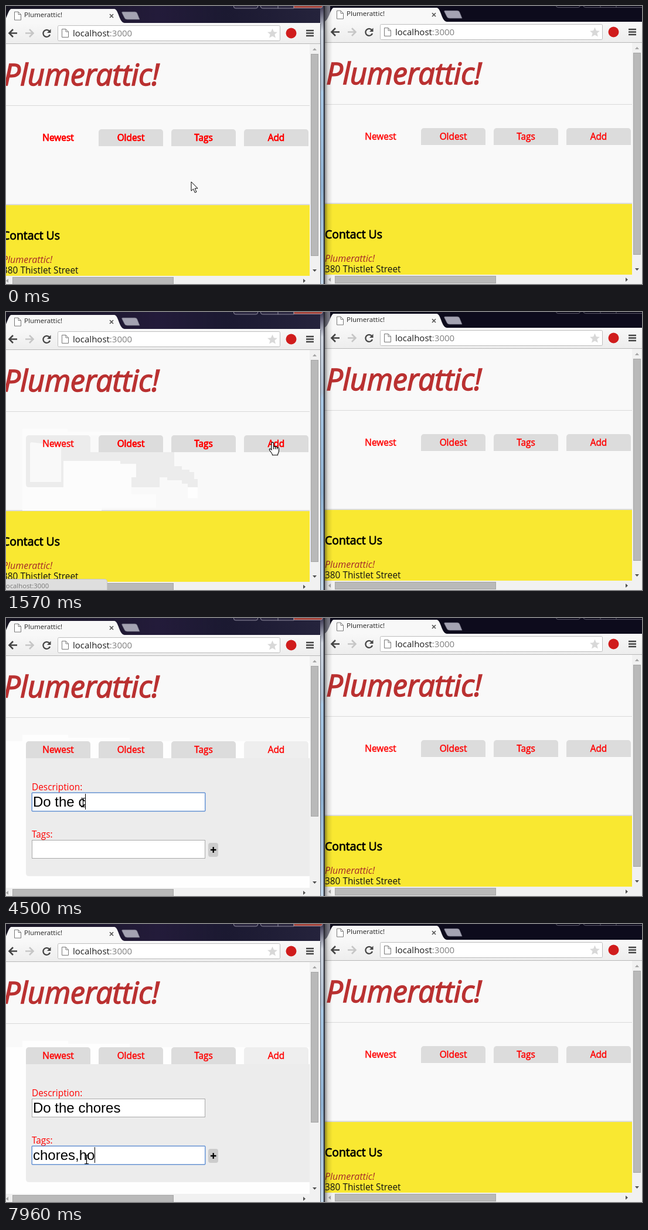
Write an HTML page that moves like this. It is 1085x476 px and loops after 8 s.

```html
<!DOCTYPE html>
<html lang="en">
<head>
<meta charset="utf-8">
<title>Plumerattic!</title>
<style>
  html, body { margin: 0; width: 100%; height: 100%; overflow: hidden; background: #1a1530; }
  svg { display: block; }
  text { font: 15.4px "Open Sans", "Noto Sans", sans-serif; }
  .mid { text-anchor: middle; }
  .tab { fill: #f00; stroke: #f00; stroke-width: .5; }
  .label { fill: #f00; }
  .url { font-size: 15px; }
  .field { fill: #fff; stroke: #a9a9a9; }
  .focus { fill: none; stroke: #5a8fdb; stroke-width: 1.3; }
  .typed { font: 24px "Liberation Sans", Arial, sans-serif; }
  .grey { fill: #dcdcdc; }
  .panel { fill: #ececec; }
  .white { fill: #fefefe; }
  .pale { fill: #fcfcfc; }
  .thumb { fill: #b9b9b9; stroke: #a6a6a6; }

  .step { animation: 8s step-end infinite; }
  .form { animation-name: form; }
  .trail1 { animation-name: trail1; }
  .trail2 { animation-name: trail2; }
  .trail3 { animation-name: trail3; }
  .focus1 { animation-name: focus1; }
  .focus2 { animation-name: focus2; }
  .type1 { animation-name: type1; }
  .type2 { animation-name: type2; }
  .caret1 { animation-name: caret1; }
  .caret2 { animation-name: caret2; }
  .arrow { animation-name: arrow; }
  .hand { animation-name: hand; }
  .beam { animation-name: beam; }
  .status { animation: status 8s linear infinite; }
  .pointer { animation: move 8s linear infinite; }

  @keyframes form { 0% { visibility: hidden } 23.125%, 100% { visibility: visible } }
  @keyframes trail1 { 0%, 23.125%, 100% { visibility: hidden } 5.7% { visibility: visible } }
  @keyframes trail2 { 0%, 23.125%, 100% { visibility: hidden } 8% { visibility: visible } }
  @keyframes trail3 { 0%, 23.125%, 100% { visibility: hidden } 10.5% { visibility: visible } }
  @keyframes focus1 { 0%, 74%, 100% { visibility: hidden } 32.75% { visibility: visible } }
  @keyframes focus2 { 0% { visibility: hidden } 74%, 100% { visibility: visible } }
  @keyframes caret1 { 0%, 39.125%, 68.5%, 100% { visibility: hidden } 32.75%, 46% { visibility: visible } }
  @keyframes caret2 { 0%, 96.5% { visibility: hidden } 74%, 96.875%, 100% { visibility: visible } }
  @keyframes arrow {
    0%, 13.1%, 28.1%, 69.25% { visibility: visible }
    10.6%, 16.5%, 30.4%, 70.7%, 100% { visibility: hidden }
  }
  @keyframes hand { 0%, 13.1%, 28.1%, 100% { visibility: hidden } 10.6%, 16.5% { visibility: visible } }
  @keyframes beam { 0%, 69.25% { visibility: hidden } 30.4%, 70.7%, 100% { visibility: visible } }
  @keyframes status { 0%, 18.5% { opacity: 0 } 19.6%, 27.9% { opacity: 1 } 29.4%, 100% { opacity: 0 } }

  /* the white sheet slides off the text, one letter at a time */
  @keyframes type1 {
    0% { transform: none }
    46% { transform: translateX(17px) }
    47.375% { transform: translateX(31px) }
    48.625% { transform: translateX(37px) }
    50% { transform: translateX(44px) }
    52% { transform: translateX(57px) }
    53.125% { transform: translateX(71px) }
    54.25% { transform: translateX(77px) }
    56.25% { transform: translateX(89px) }
    57.45% { transform: translateX(103px) }
    58.625% { transform: translateX(116px) }
    59.875% { transform: translateX(124px) }
    61% { transform: translateX(137px) }
    62.25%, 100% { transform: translateX(149px) }
  }
  @keyframes type2 {
    0% { transform: none }
    79.625% { transform: translateX(12px) }
    80.75% { transform: translateX(25px) }
    81.875% { transform: translateX(39px) }
    83% { transform: translateX(47px) }
    84.125% { transform: translateX(60px) }
    85.25% { transform: translateX(72px) }
    90.25% { transform: translateX(79px) }
    96.875% { transform: translateX(92px) }
    99.5%, 100% { transform: translateX(105px) }
  }
  @keyframes move {
    0%, 4.3% { transform: translate(316px, 301px) }
    5.75% { transform: translate(280px, 268px) }
    7% { transform: translate(225px, 266px) }
    8.1% { transform: translate(160px, 312px) }
    9% { transform: translate(90px, 350px) }
    9.9% { transform: translate(34px, 290px) }
    10.7% { transform: translate(48px, 228px) }
    11.6% { transform: translate(105px, 233px) }
    12.875% { transform: translate(209px, 235px) }
    13.6% { transform: translate(265px, 284px) }
    14.375% { transform: translate(326px, 303px) }
    15.5% { transform: translate(394px, 272px); animation-timing-function: ease-out }
    17%, 26.1% { transform: translate(455px, 223px); animation-timing-function: ease-in-out }
    32.5%, 68% { transform: translate(131px, 316px); animation-timing-function: ease-in-out }
    72.125%, 100% { transform: translate(137px, 403px) }
  }
</style>
</head>
<body>
<svg width="1085" height="476">
  <defs>
    <linearGradient id="sky">
      <stop offset="0" stop-color="#15131f"/><stop offset=".48" stop-color="#231b3a"/>
      <stop offset=".7" stop-color="#1b1931"/><stop offset="1" stop-color="#25233c"/>
    </linearGradient>
    <linearGradient id="bar" x2="0" y2="1">
      <stop offset="0" stop-color="#f8f8f8"/><stop offset="1" stop-color="#ededed"/>
    </linearGradient>
    <linearGradient id="edge" x2="0" y2="1">
      <stop offset="0" stop-color="#3a3650"/><stop offset=".09" stop-color="#d0d6e0"/>
      <stop offset=".29" stop-color="#aebfd2"/><stop offset=".31" stop-color="#a9c9e6"/>
      <stop offset=".65" stop-color="#8fb2d3"/><stop offset="1" stop-color="#c2d7ea"/>
    </linearGradient>
    <linearGradient id="shade">
      <stop offset="0" stop-opacity=".42"/><stop offset=".4" stop-opacity=".12"/><stop offset="1" stop-opacity="0"/>
    </linearGradient>

    <path id="tabshape" d="M0 29V5a5 5 0 0 1 5-5H105a5 5 0 0 1 5 5V29Z"/>
    <g id="sheet" fill="#fff" stroke="#777">
      <path d="M.5 .5H7L11.500 5V14.500H.5Z"/><path d="M7 .5V5H11.500" fill="none"/>
    </g>
    <g id="names" class="tab mid">
      <text x="89" y="231">Newest</text>
      <text x="213" y="231">Oldest</text>
      <text x="337" y="231">Tags</text>
      <text x="461" y="231">Add</text>
    </g>

    <g id="window">
      <!-- browser tab and toolbar -->
      <path d="M-8 29C1 28 3 6 9 5H185C192 6 193 28 202 29Z" fill="#f8f8f8"/>
      <path d="M199 10H220Q223 10 224 13L228 23H207Q203 23 202 20L198 12Q197 10 199 10Z" fill="#a4a3b2" stroke="#6c6a7c" stroke-width=".7"/>
      <use href="#sheet" x="14" y="9.500"/>
      <text x="31" y="19" style="font-size:11.600px" fill="#222">Plumerattic!</text>
      <path d="M177 14L183 20M183 14L177 20" stroke="#555" stroke-width="1.700"/>
      <rect x="-8" y="29" width="545" height="36" fill="url(#bar)"/>
      <path d="M-8 64.500H537" stroke="#b8b8b8"/>
      <path d="M19 46.500H6M12 40L5.500 46.500 12 53" fill="none" stroke="#444" stroke-width="2.600"/>
      <path d="M33 46.500H46M40 40L46.500 46.500 40 53" fill="none" stroke="#c6c6c6" stroke-width="2.600"/>
      <path d="M74 43A6 6 0 1 0 75 49" fill="none" stroke="#444" stroke-width="2.300"/>
      <path d="M76.500 39.500V46H70Z" fill="#444"/>
      <rect x="88.500" y="33.500" width="379" height="26" rx="2" fill="#fff" stroke="#bdbdbd"/>
      <use href="#sheet" x="95" y="39"/>
      <text class="url" x="114" y="52" fill="#1c1c1c">localhost<tspan fill="#808080">:3000</tspan></text>
      <path d="M454.500 38.500L457 44.300 463 44.700 458.400 48.600 459.900 54.600 454.500 51.400 449.100 54.600 450.600 48.600 446 44.700 452 44.300Z" fill="#d8d8d8"/>
      <circle cx="486.500" cy="46.500" r="9" fill="#d01c1c"/>
      <path d="M512 42H525M512 46.500H525M512 51H525" stroke="#444" stroke-width="2.600"/>

      <!-- page -->
      <rect x="-8" y="65" width="545" height="420" fill="#f9f9f9"/>
      <path d="M-8 170.500H518" stroke="#d9d9d9"/>
      <text x="-4" y="136" style="font-size:51px;font-style:italic;letter-spacing:-.5px" fill="#ba3131" stroke="#ba3131" stroke-width="1.500">Plumerattic!</text>
      <use href="#tabshape" class="grey" x="158" y="211"/>
      <use href="#tabshape" class="grey" x="282" y="211"/>
      <use href="#tabshape" class="grey" x="406" y="211"/>
      <use href="#names"/>
      <rect x="-8" y="341" width="526" height="121" fill="#f9e831"/>
      <path d="M-8 340H518" stroke="#dcdcdc" stroke-width="2"/>
      <text x="-6" y="400" style="font-size:19.400px" stroke="#000" stroke-width=".8">Contact Us</text>
      <text x="-6" y="440" style="font-size:16px;font-style:italic" fill="#a52a2a">Plumerattic!</text>
      <text x="-6" y="458" fill="#111">380 Thistlet Street</text>

      <!-- scrollbars -->
      <rect x="518" y="65" width="17" height="420" fill="#f1f1f1"/>
      <rect x="-8" y="462" width="526" height="20" fill="#f1f1f1"/>
      <rect class="thumb" x="520.500" y="82.500" width="12" height="345"/>
      <rect class="thumb" x="11.500" y="464.500" width="274" height="12"/>
      <path d="M523 76L526.500 72 530 76ZM4 467V474L0 470.500Z" fill="#a5a5a5"/>
      <path d="M523 451H530L526.500 455ZM507 467V474L511 470.500Z" fill="#505050"/>
    </g>
  </defs>

  <!-- left window -->
  <svg width="537" height="476">
    <rect width="537" height="30" fill="url(#sky)"/>
    <use href="#window"/>

    <g class="step trail3">
      <path class="pale" d="M28 200H105V205H211V211H144V240H98V340H28Z"/>
      <use href="#tabshape" class="panel" x="34" y="211"/>
      <path class="panel" d="M34 240H224V255H98V300H39Q34 300 34 295Z"/>
      <path fill="#f9f9f9" d="M43 223L94 229V291H41V225Z"/>
    </g>
    <path class="pale step trail2" d="M98 255H222V283H214V312H256V335H163V340H98Z"/>
    <g class="step trail1">
      <path class="panel" d="M195 240H287V264H300V270H313V274H321V286H327V300H310V294H300V288H275V283H262V300H214V283H222V260H195Z"/>
      <rect class="white" x="310" y="300" width="17" height="19"/>
    </g>
    <use href="#names"/>

    <g class="step form">
      <path class="white" d="M28 200H106V205H211V211H518V462H0V211H28Z"/>
      <use href="#tabshape" class="grey" x="34" y="211"/>
      <use href="#tabshape" class="grey" x="158" y="211"/>
      <use href="#tabshape" class="grey" x="282" y="211"/>
      <use href="#tabshape" fill="#eee" x="406" y="211"/>
      <path class="panel" d="M34 240H518V442H39Q34 442 34 437Z"/>
      <use href="#names"/>
      <rect x="518" y="340" width="17" height="100" fill="#f1f1f1"/>
      <path d="M520 339.500H533" stroke="#a6a6a6"/>

      <text class="label" x="44" y="295">Description:</text>
      <rect class="field" x="44.500" y="299.500" width="295" height="31"/>
      <text class="typed" x="46" y="323">Do the chores</text>
      <text class="label" x="44" y="376">Tags:</text>
      <rect class="field" x="44.500" y="380.500" width="295" height="31"/>
      <text class="typed" x="46" y="404">chores,ho</text>
      <rect x="345" y="385" width="17" height="24" rx="4" fill="#ccc"/>
      <path d="M349 397H358.500M353.700 392V402" stroke="#000" stroke-width="2.300"/>

      <svg x="45" y="300" width="294" height="30">
        <g class="step type1">
          <rect x="1" width="300" height="30" fill="#fff"/>
          <rect class="step caret1" x="1" y="1" width="1" height="27"/>
        </g>
      </svg>
      <svg x="45" y="381" width="294" height="30">
        <g class="step type2">
          <rect x="1" width="300" height="30" fill="#fff"/>
          <rect class="step caret2" x="1" y="1" width="1" height="27"/>
        </g>
      </svg>
      <rect class="focus step focus1" x="44.200" y="299.200" width="295.600" height="31.600" rx="1"/>
      <rect class="focus step focus2" x="44.200" y="380.200" width="295.600" height="31.600" rx="1"/>
    </g>

    <g class="status">
      <path d="M-2 457.500H168Q172.500 457.500 172.500 462V478H-2Z" fill="#dedede" stroke="#c6c6c6"/>
      <text x="-3" y="473" style="font-size:11.300px" fill="#777">localhost:3000</text>
    </g>
  </svg>

  <!-- gap between the windows -->
  <rect x="536" width="8" height="476" fill="url(#edge)"/>
  <path d="M536.500 30V476" stroke="#5d6470"/>
  <path d="M542.800 0V476" stroke="#23232b" stroke-width="2"/>
  <g fill="#2b2740" stroke="#aaa6b8" stroke-width=".8">
    <path d="M388.500 -1V1Q388.500 4 392 4H426Q429.500 4 429.500 1V-1"/>
    <path d="M434.500 -1V1Q434.500 4 438 4H491V-1M464 -1V4"/>
    <path d="M491 -1V3.500H536Q540 3.500 540 0V-1" fill="#a8453c"/>
  </g>

  <!-- right window -->
  <svg x="544" width="541" height="476">
    <rect width="541" height="28" fill="#0d0b1c"/>
    <rect width="9" height="28" fill="#c9cad4" opacity=".6"/>
    <use href="#window" x="6" y="-2"/>
    <path d="M394.500 -1V0Q395 2.500 398 2.500H432Q435.500 2.500 435.500 -1M441 -1Q441 2.500 445 2.500H541M470 -1V2.500M497 -1V2.500" fill="none" stroke="#6f6c7c" stroke-width=".8"/>
    <rect width="13" height="476" fill="url(#shade)"/>
  </svg>

  <g class="pointer" stroke="#000" fill="#fff">
    <path class="step arrow" d="M0 0V15.500L3.600 12.200 6.300 18.500 8.900 17.400 6.200 11.200H11Z"/>
    <path class="step hand" stroke-width="1.100" d="M-2 2C-2 -.5 1.500 -.5 1.500 2V8C2 6.500 4.500 7 4.500 8.500 5.500 7 7.500 7.500 7.500 9.500 9 8.500 10.500 9.500 10.500 11V15C10.500 18 8.500 19 8.500 22H-.5C-.5 19 -4 16 -5.500 13.500 -6.500 11 -4 10.500 -2 13ZM1.500 8V12M4.500 8.500V12M7.500 9.500V12"/>
    <path class="step beam" fill="none" stroke-width="1.200" d="M-3 -7.500H-1Q.5 -7.500 .5 -6 .5 -7.500 2 -7.500H4M.5 -6V6M-3 7.500H-1Q.5 7.500 .5 6 .5 7.500 2 7.500H4"/>
  </g>
</svg>
</body>
</html>
```
